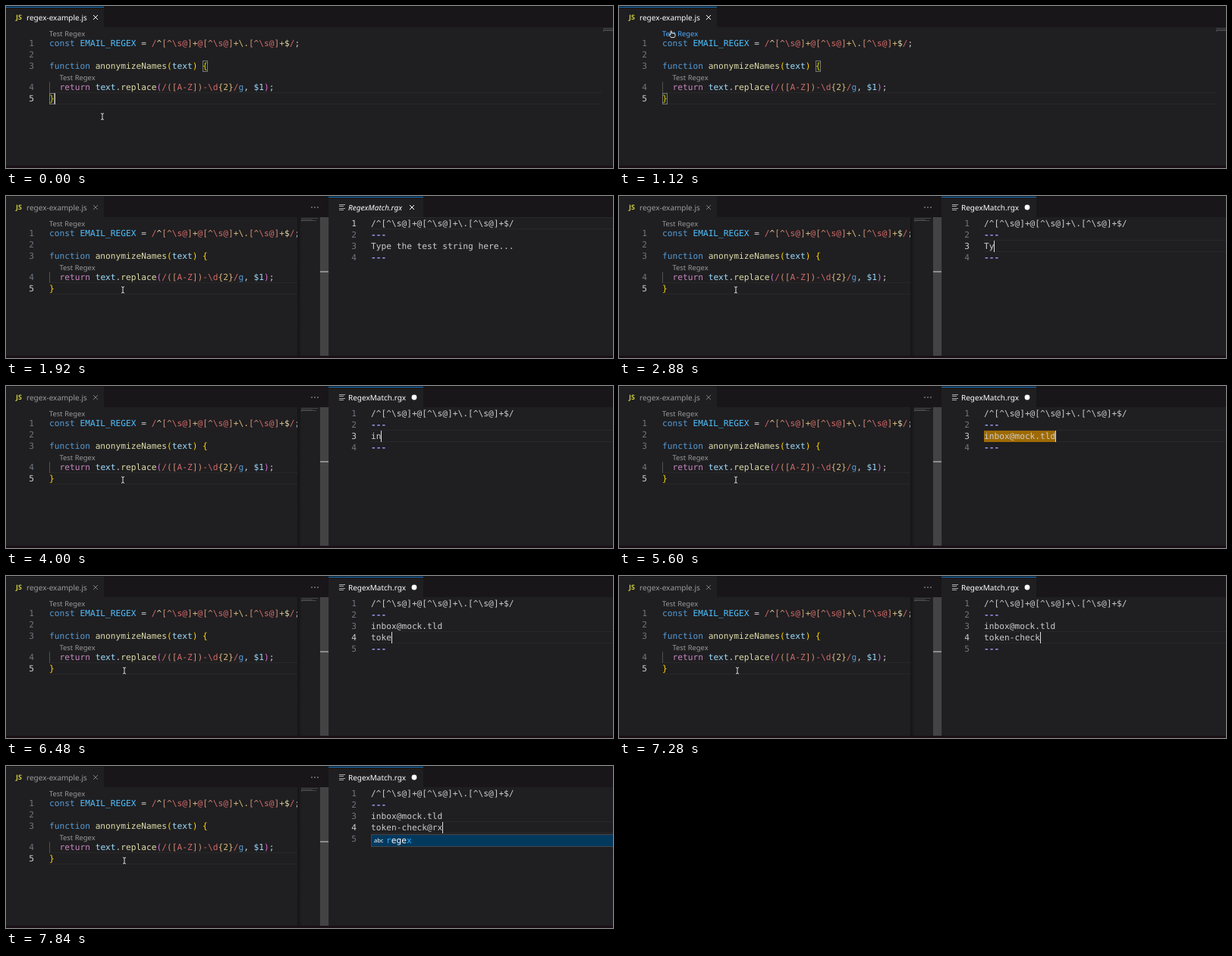
Recreate the animation shown at these times as an HTML page. Size 800 by 214 pixels, loop 8 s.

```html
<!DOCTYPE html>
<html lang="en">
<head>
<meta charset="utf-8">
<title>Regex tester</title>
<style>
html, body { margin: 0; width: 100%; height: 100%; overflow: hidden; background: #1f1e20; }
#stage { position: absolute; left: 0; top: 0; width: 800px; height: 214px; overflow: hidden; background: #1f1e20; }
#stage div { position: absolute; box-sizing: border-box; }
.pane { top: 0; height: 214px; overflow: hidden; }
.t { white-space: pre; text-rendering: geometricPrecision; font-variant-ligatures: none; }
.mono { font: 11.2px/15px "DejaVu Sans Mono", monospace; color: #ccc; }
.ui { font: 10px/14px "Noto Sans", sans-serif; color: #fff; }
.lens { font: 9.4px/13px "Noto Sans", sans-serif; color: #999; }
.num { width: 20px; text-align: right; color: #6e7681; }
svg { position: absolute; left: 0; top: 0; overflow: visible; }
</style>
</head>
<body>
<div id="stage"></div>
<script>
const LOOP = 8000, CW = 6.743, LH = 15;
const OPEN = 1280, CLEAR = 2040, CLEARED = 2960, ENTER = 5840;
const HINT = 'Type the test string here...';
const FIRST = 'inbox@mock.tld', SECOND = 'token-check@rx';
const FIRST_KEYS = [3840, 4000, 4080, 4160, 4240, 4400, 4640, 4720, 4800, 4880, 5040, 5120, 5200, 5280];
const SECOND_KEYS = [6080, 6240, 6400, 6480, 6640, 6720, 6800, 6880, 6960, 7040, 7120, 7360, 7600, 7840];
const POPUP = 7680;
const BAR = '#181619', BG = '#1f1e20', EDGE = '#252426', ACCENT = '#0c72c4';
const stage = document.getElementById('stage');

function el(parent, x, y, cls = '', css = {}) {
  const d = document.createElement('div');
  d.className = cls;
  Object.assign(d.style, { left: x + 'px', top: y + 'px' }, css);
  parent.append(d);
  return d;
}
const box = (p, x, y, w, h, background) =>
  el(p, x, y, '', { width: w + 'px', height: h + 'px', background });
function text(p, x, y, cls, str, color) {
  const d = el(p, x, y, 't ' + cls, color ? { color } : {});
  d.textContent = str;
  return d;
}
// Tokens alternate colour and text
function code(p, x, y, tokens) {
  const line = text(p, x, y, 'mono', '');
  for (let i = 0; i < tokens.length; i += 2) {
    const s = document.createElement('span');
    s.style.color = tokens[i];
    s.textContent = tokens[i + 1];
    line.append(s);
  }
  return line;
}
const show = (d, on) => { d.style.display = on ? '' : 'none'; };
function put(d, x, y) { d.style.left = x + 'px'; d.style.top = y + 'px'; }
function set(d, str) { if (d.textContent !== str) d.textContent = str; }
const lineFrame = (p, x, y, w) =>
  el(p, x, y, '', { width: w + 'px', height: LH + 1 + 'px', border: 'solid #292829', borderWidth: '1px 0' });

function svg(p, x, y, body) {
  const d = el(p, x, y);
  d.innerHTML = `<svg width="1" height="1" fill="none">${body}</svg>`;
  return d;
}
function cross(p, x, y) {
  const d = svg(p, x, y, '<path d="M-3-3L3 3M3-3L-3 3" stroke="currentColor"/>');
  d.style.color = '#fff';
  return d;
}
function minimap(p, x) {
  const g = el(p, x, 29);
  [22, 0, 15, 20, 1].forEach((w, i) => w && box(g, 0, i, w, 1, '#454447'));
  return g;
}
function tab(p, x, w) {
  box(p, 0, 0, 800, 28, BAR);
  box(p, x, 1, w, 28, BG);
  return box(p, x, 1, w, 1, ACCENT);
}

// Left editor
const left = el(stage, 0, 0, 'pane');
const leftTop = tab(left, 0, 129);
const js = text(left, 13, 8, 'ui', 'JS', '#cbcb41');
js.style.fontSize = '9px';
js.style.fontWeight = 'bold';
const leftTitle = text(left, 27, 8, 'ui', 'regex-example.js');
const leftClose = cross(left, 118, 15);
const dots = svg(left, 406.5, 15, [-4, 0, 4].map(x => `<circle cx="${x}" r=".8" fill="#bbb"/>`).join(''));

const rows = [42, 57, 72, 100, 115];
const leftLine = lineFrame(left, 57, rows[4] - 1, 729);
rows.forEach((y, i) => text(left, 17, y, 'mono num', i + 1, i === 4 ? '#ccc' : ''));
const lens = text(left, 57, 30, 'lens', 'Test Regex');
text(left, 70.5, 88, 'lens', 'Test Regex');

const BLUE = '#569cd6', RED = '#d16969', ORANGE = '#ce9178', TAN = '#d7ba7d', YELLOW = '#dcdcaa',
  VAR = '#9cdcfe', GOLD = '#ffd700', PINK = '#da70d6', PLAIN = '#ccc';
const notAt = [ORANGE, '[^', RED, '\\s@', ORANGE, ']', TAN, '+'];
code(left, 57, rows[0], [BLUE, 'const ', '#4fc1ff', 'EMAIL_REGEX', PLAIN, ' = ', RED, '/', YELLOW, '^',
  ...notAt, RED, '@', ...notAt, TAN, '\\.', ...notAt, YELLOW, '$', RED, '/', PLAIN, ';']);
code(left, 57, rows[2], [BLUE, 'function ', YELLOW, 'anonymizeNames', GOLD, '(', VAR, 'text', GOLD, ') {']);
code(left, 57, rows[3], [PINK, '  ', '#c586c0', 'return ', VAR, 'text', PLAIN, '.', YELLOW, 'replace', PINK, '(',
  RED, '/', ORANGE, '([', RED, 'A-Z', ORANGE, '])', RED, '-\\d', TAN, '{2}', RED, '/', BLUE, 'g',
  PLAIN, ', ', VAR, '$1', PINK, ')', PLAIN, ';']);
code(left, 57, rows[4], [GOLD, '}']);
box(left, 57, rows[3], 1, LH, '#505050');
const pairs = [[57 + 30 * CW, rows[2]], [57, rows[4]]].map(([x, y]) =>
  el(left, x, y, '', { width: '7px', height: LH + 'px', border: '1px solid #777', background: '#0064001a' }));
const leftCaret = box(left, 57 + CW, rows[4], 1, LH, '#ccc');

const wideMap = minimap(left, 787);
const side = el(left, 384, 0);
box(side, 0, 28, 41, 186, `linear-gradient(90deg, #141315, ${BG} 6px)`);
box(side, 30, 28, 11, 186, '#434344');
box(side, 30, 99, 11, 2, '#8c8c8c');
minimap(side, 5);

// Right editor
const right = el(stage, 425, 0, 'pane', { width: '375px', background: BG });
tab(right, 0, 125);
box(right, 0, 28, 1, 186, EDGE);
[8, 6, 8, 6].forEach((w, i) => box(right, 14, 11 + i * 2.4, w, 1, '#a8a8a8'));
const rightTitle = text(right, 26, 8, 'ui', 'RegexMatch.rgx');
const rightClose = cross(right, 110, 15);
const dirty = svg(right, 113, 15, '<circle r="3.4" fill="#fff"/>');

const TX = 56, rowY = i => 29 + i * LH;
const rightLine = lineFrame(right, TX, rowY(0), 319);
const match = box(right, TX, rowY(2), 14 * CW, LH, '#9e6a03');
const nums = [1, 2, 3, 4, 5].map((n, i) => text(right, 17, rowY(i), 'mono num', n));
const lines = nums.map((n, i) => text(right, TX, rowY(i), 'mono', ''));
lines[0].textContent = '/^[^\\s@]+@[^\\s@]+\\.[^\\s@]+$/';
const rightCaret = box(right, TX, rowY(0), 1, LH, '#ddd');

const popup = el(right, TX, 90, '', { width: '330px', height: '17px', background: '#04395e', border: '1px solid #454545' });
const abc = text(popup, 3, 0.5, 'ui', 'abc', '#fff');
abc.style.fontSize = '7.5px';
const word = code(popup, 19, 0, ['#2aaaff', 'r', '#fff', 'ege', '#fff', 'x']);

// Window edge
box(stage, 0, 0, 800, 1, '#121212');
box(stage, 0, 211, 800, 3, '#191116');

// Pointers
const beam = svg(stage, 0, 0, [['#111', 2.4], ['#eee', 1]].map(([c, w]) =>
  `<path d="M-2-4.2Q0-4.2 0-3Q0-4.2 2-4.2M0-3V3M-2 4.2Q0 4.2 0 3Q0 4.2 2 4.2" stroke="${c}" stroke-width="${w}"/>`).join(''));
const hand = svg(stage, 0, 0,
  '<path d="M-2 1V-3.6Q-1.2-4.6-.4-3.6V-1Q3-1.2 4-.2V2.6Q3.6 4 3 4.6H-1.4Q-2.4 3-4 1.2Q-3.4 0-2 1Z" ' +
  'fill="#222" stroke="#e8e8e8" stroke-width="1"/>');

const ease = u => { u = Math.min(1, Math.max(0, u)); return u * u * (3 - 2 * u); };
const mix = (a, b, u) => a + (b - a) * u;
const typed = (keys, t) => keys.filter(k => k <= t).length;
const blink = dt => Math.floor(dt / 500) % 2 === 0;

function drawPointer(t) {
  let x, y;
  if (t < 1400) {
    const u = ease((t - 540) / 460);
    x = mix(127, 70, u); y = mix(146, 37, u);
  } else {
    const u = ease((t - 1400) / 280);
    x = mix(70, 154, u); y = mix(37, 123.7, u);
  }
  if (t >= ENTER) { x = 155.5; y = 124.7; }
  const over = y < 42;
  show(hand, over);
  show(beam, !over);
  put(over ? hand : beam, x, y);
  lens.style.color = over ? '#4daafc' : '';
}

function drawLeft(t, open) {
  left.style.width = open ? '425px' : '800px';
  leftTop.style.background = open ? EDGE : ACCENT;
  leftTitle.style.color = open ? '#9d9d9d' : '#fff';
  leftClose.style.color = open ? '#7a7a7a' : '#fff';
  leftLine.style.width = open ? '328px' : '729px';
  pairs.forEach(p => show(p, !open));
  show(leftCaret, !open && (t < 80 || !blink(t - 80)));
  show(wideMap, !open);
  show(dots, open);
  show(side, open);
}

function drawRight(t) {
  const edited = t >= CLEAR, second = t >= ENTER;
  const n1 = typed(FIRST_KEYS, t), n2 = typed(SECOND_KEYS, t);
  const rest = Math.max(0, Math.floor(HINT.length * (CLEARED - t) / (CLEARED - CLEAR)));
  const third = n1 ? FIRST.slice(0, n1) : HINT.slice(0, edited ? rest : HINT.length);

  rightTitle.style.fontStyle = edited ? 'normal' : 'italic';
  show(rightClose, !edited);
  show(dirty, edited);

  const body = ['---', third, ...(second ? [SECOND.slice(0, n2)] : []), '---'];
  for (let i = 1; i < 5; i++) {
    const str = body[i - 1] || '', rule = str === '---';
    set(lines[i], str);
    lines[i].style.color = rule ? '#9090e8' : '';
    lines[i].style.fontWeight = rule ? 'bold' : '';
  }
  const row = t < 2000 ? 0 : second ? 3 : 2;
  nums.forEach((n, i) => {
    show(n, i < 4 || second);
    n.style.color = i === row ? '#ccc' : '';
  });
  put(rightLine, TX, rowY(row) - 1);

  show(match, n1 > 11 && !second);
  match.style.width = n1 * CW + 'px';

  const col = row === 0 ? 0 : row === 2 ? third.length : n2;
  const stamps = [OPEN, 2000, Math.min(t, CLEARED), ENTER, ...FIRST_KEYS, ...SECOND_KEYS];
  const last = t < 2000 ? OPEN : Math.max(...stamps.filter(s => s <= t));
  put(rightCaret, TX + col * CW, rowY(row));
  show(rightCaret, blink(t - last));

  show(popup, t >= POPUP);
  word.lastChild.style.color = n2 === SECOND.length ? '#2aaaff' : '#fff';
}

function frame(now) {
  const t = now % LOOP, open = t >= OPEN;
  drawLeft(t, open);
  show(right, open);
  if (open) drawRight(t);
  drawPointer(t);
  requestAnimationFrame(frame);
}
frame(0);
</script>
</body>
</html>
```
